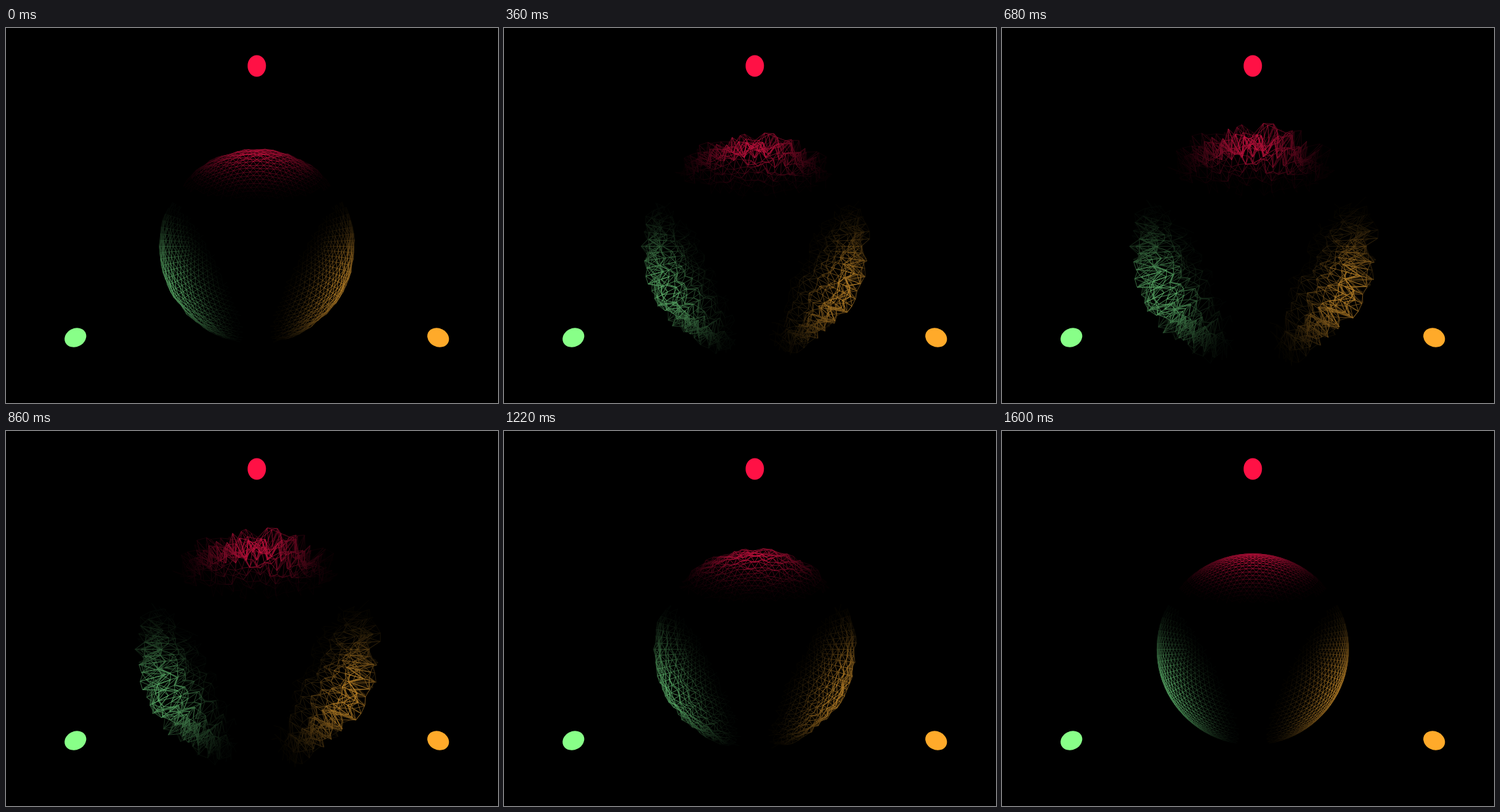
Write an HTML page with a canvas that moves like this. It is 750 px wide and 573 px high and loops after 1620 ms.

```html
<!DOCTYPE html>
<html lang="en">
<head>
<meta charset="utf-8">
<title>Lit wire sphere</title>
<style>
  html, body { margin: 0; width: 100%; height: 100%; overflow: hidden; background: #000; }
  canvas { display: block; }
</style>
</head>
<body>
<canvas id="stage" width="750" height="573"></canvas>
<script>
const ctx = document.getElementById('stage').getContext('2d');
const LOOP = 1620, FOCAL = 442, RADIUS = 138.6, PARTS = 16, LEVELS = 24;
const CX = 382.3, CY = 333.5;

const lights = [
  { x: 0, y: 275.5, ball: '#ff1145', wire: [226, 20, 72] },
  { x: -276.5, y: -139.5, ball: '#88ff88', wire: [104, 198, 120] },
  { x: 276.5, y: -139.5, ball: '#ffaa2a', wire: [212, 148, 46] }
];

// Spike height over time: [ms, px]
const keys = [[-120, 0.6], [0, 2.8], [200, 14.5], [520, 35], [690, 38.5],
              [860, 36.5], [1060, 17.5], [1380, 1.4], [1620, 0], [1800, 0]];

function spikeHeight(t) {
  let i = 1;
  while (i < keys.length - 3 && t >= keys[i + 1][0]) i++;
  const [a, b, c, d] = keys.slice(i - 1, i + 3);
  const span = c[0] - b[0], u = (t - b[0]) / span;
  const m1 = (c[1] - a[1]) / (c[0] - a[0]) * span;
  const m2 = (d[1] - b[1]) / (d[0] - b[0]) * span;
  const u2 = u * u, u3 = u2 * u;
  return Math.max(0, (2 * u3 - 3 * u2 + 1) * b[1] + (u3 - 2 * u2 + u) * m1 +
    (3 * u2 - 2 * u3) * c[1] + (u3 - u2) * m2);
}

let seed = 7;
function random() {
  seed = (seed * 16807) % 2147483647;
  return seed / 2147483647;
}

// Icosahedron with every face split into a triangular grid and pushed onto the sphere
const points = [], edges = [];

function buildSphere() {
  const phi = (1 + Math.sqrt(5)) / 2, corners = [];
  for (const a of [-1, 1]) for (const b of [-phi, phi]) {
    corners.push([0, a, b], [a, b, 0], [b, 0, a]);
  }
  const near = (p, q) => Math.hypot(p[0] - q[0], p[1] - q[1], p[2] - q[2]) < 2.1;
  const pointIds = new Map(), edgeIds = new Set();

  function addPoint(v) {
    const len = Math.hypot(...v), n = v.map(c => c / len);
    const key = n.map(c => Math.round(c * 1e4)).join();
    if (!pointIds.has(key)) {
      pointIds.set(key, points.length);
      points.push({ n, spike: random(), light: [0, 0, 0] });
    }
    return pointIds.get(key);
  }
  function addEdge(a, b) {
    const key = Math.min(a, b) * 1e5 + Math.max(a, b);
    if (edgeIds.has(key)) return;
    edgeIds.add(key);
    edges.push([points[a], points[b]]);
  }
  function splitFace(p, q, r) {
    const at = (i, j) => addPoint(p.map((c, k) =>
      c + (q[k] - c) * i / PARTS + (r[k] - c) * j / PARTS));
    for (let i = 0; i < PARTS; i++) for (let j = 0; i + j < PARTS; j++) {
      const a = at(i, j), b = at(i + 1, j), c = at(i, j + 1);
      addEdge(a, b);
      addEdge(b, c);
      addEdge(c, a);
    }
  }
  corners.forEach((p, i) => corners.forEach((q, j) => corners.forEach((r, k) => {
    if (i < j && j < k && near(p, q) && near(q, r) && near(p, r)) splitFace(p, q, r);
  })));
}

function placePoint(p, height) {
  const r = RADIUS + height * p.spike;
  const [nx, ny, nz] = p.n, x = nx * r, y = ny * r, z = nz * r;
  const scale = FOCAL / (FOCAL - z);
  p.x = CX + x * scale;
  p.y = CY - y * scale;
  lights.forEach((l, i) => {
    const dx = l.x - x, dy = l.y - y;
    const facing = (nx * dx + ny * dy - nz * z) / Math.hypot(dx, dy, z);
    p.light[i] = Math.max(0, facing - 0.08) ** 1.7;
  });
}

function drawWire(height) {
  points.forEach(p => placePoint(p, height));
  const buckets = lights.map(() => Array.from({ length: LEVELS + 1 }, () => []));
  for (const edge of edges) {
    const [a, b] = edge;
    const sums = a.light.map((v, i) => v + b.light[i]);
    const best = Math.max(...sums);
    const level = Math.round(best / 2 * LEVELS);
    if (level) buckets[sums.indexOf(best)][level].push(edge);
  }
  ctx.lineWidth = 0.85;
  for (let level = 1; level <= LEVELS; level++) {
    lights.forEach((l, i) => {
      const rgb = l.wire.map(c => Math.round(c * level / LEVELS));
      ctx.strokeStyle = `rgb(${rgb})`;
      ctx.beginPath();
      for (const [a, b] of buckets[i][level]) {
        ctx.moveTo(a.x, a.y);
        ctx.lineTo(b.x, b.y);
      }
      ctx.stroke();
    });
  }
}

function drawBall(l) {
  const stretch = Math.hypot(FOCAL, l.x, l.y) / FOCAL;
  ctx.fillStyle = l.ball;
  ctx.beginPath();
  ctx.ellipse(CX + l.x, CY - l.y, 14 * stretch, 14, Math.atan2(-l.y, l.x), 0, 2 * Math.PI);
  ctx.fill();
}

function frame() {
  ctx.fillStyle = '#000';
  ctx.fillRect(0, 0, 750, 573);
  drawWire(spikeHeight(performance.now() % LOOP));
  lights.forEach(drawBall);
  requestAnimationFrame(frame);
}

buildSphere();
frame();
</script>
</body>
</html>
```
